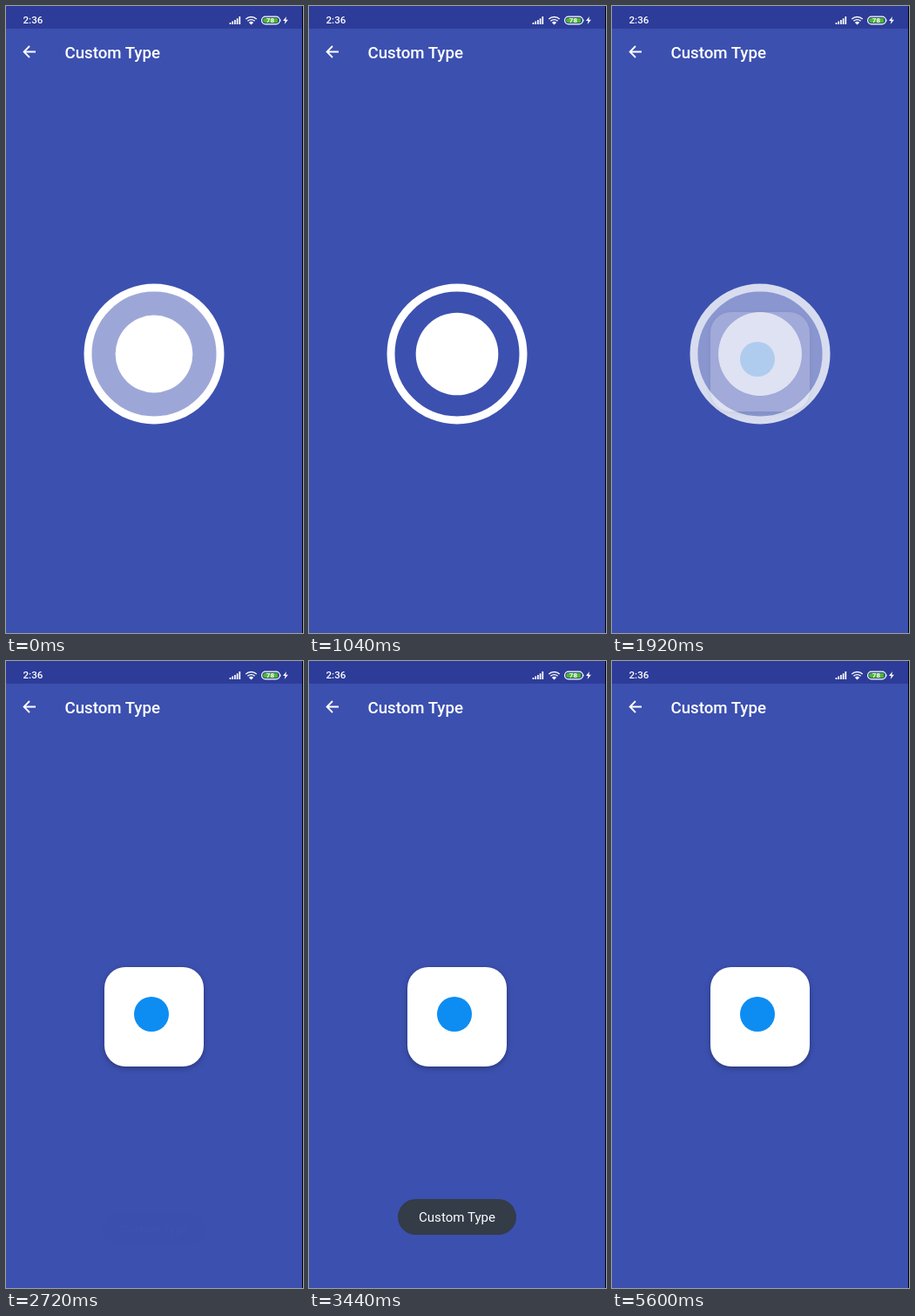
Recreate the animation shown at these times as an HTML page. Size 341x719 px, loop 5.68 s.

```html
<!DOCTYPE html>
<html lang="en">
<head>
<meta charset="utf-8">
<title>Custom Type</title>
<style>
  html, body { margin: 0; height: 100%; overflow: hidden; background: #3c50b0; }
  svg { display: block; width: 341px; height: 719px; font-family: Roboto, sans-serif; }
  #tile { filter: drop-shadow(0 2px 3px rgba(0, 0, 0, .3)); }
</style>
</head>
<body>
<svg viewBox="0 0 341 719" fill="#fff">
  <rect width="341" height="719" fill="#3c50b0"/>
  <rect width="341" height="26" fill="#2c3c98"/>

  <!-- status bar -->
  <text x="19.5" y="20.4" font-size="11.6" font-weight="500">2:36</text>
  <path d="M257.5 21v-2M260.2 21v-3.4M262.9 21v-5M265.6 21v-6.8M268.3 21v-9" stroke="#fff" stroke-width="1.7"/>
  <g fill="none" stroke="#fff" stroke-width="1.4">
    <path d="M275.3 15a9 9 0 0 1 12.4 0M277.4 17.2a6 6 0 0 1 8.2 0"/>
    <rect x="293.6" y="12.2" width="20.8" height="8.6" rx="4.3" stroke-width="1.2"/>
  </g>
  <path d="M278.9 18.9a4 4 0 0 1 5.2 0L281.5 21.6z"/>
  <path d="M298 13.7h14v5.6h-14a2.8 2.8 0 0 1 0-5.6z" fill="#4cb82e"/>
  <path d="M315.2 15q1.2 1.5 0 3z"/>
  <text x="303.4" y="19.4" font-size="8" font-weight="700" text-anchor="middle">78</text>
  <path d="M322 12l-4 5h2.6l-1 4 4.3-5.2h-2.7z"/>

  <!-- app bar -->
  <path d="M34 52.5H20.8M27 46l-6.4 6.5 6.4 6.5" fill="none" stroke="#fff" stroke-width="1.8"/>
  <text x="67.5" y="60" font-size="18.7" font-weight="500">Custom Type</text>

  <g id="loader" transform="translate(170 399)">
    <circle id="sector" r="36" fill="none" stroke="#9da7d7" stroke-width="72" pathLength="360" transform="rotate(-90)"/>
    <circle r="76" fill="none" stroke="#fff" stroke-width="9"/>
    <circle id="core"/>
  </g>

  <g id="tile">
    <rect x="113" y="351" width="114" height="114" rx="24"/>
    <circle cx="167" cy="405" r="20" fill="#0d8df2"/>
  </g>

  <g id="toast">
    <rect x="-68" y="-20.5" width="136" height="41" rx="20.5" fill="#333c47"/>
    <text y="5.5" font-size="15.1" text-anchor="middle">Custom Type</text>
  </g>

  <rect x="340" width="1" height="719" fill="#000"/>
</svg>
<script>
const LOOP = 5680;
const [loader, sector, core, tile, toast] =
  ['loader', 'sector', 'core', 'tile', 'toast'].map(id => document.getElementById(id));

const clamp = x => Math.min(1, Math.max(0, x));
const ease = (t, start, length) => (1 - Math.cos(Math.PI * clamp((t - start) / length))) / 2;
const settle = (t, start, tau) => 1 - Math.exp(-Math.max(0, t - start) / tau);

function drawLoader(t) {
  // the spinner stalls briefly between emptying and refilling
  if (t > 1040 && t < 1200) t = 1040;
  const start = t < 1040 ? 360 * ease(t, 0, 600) : 0;
  const sweep = t < 1040 ? 360 - start : 360 * ease(t, 1174, 600);
  const visible = sweep > 0.01;
  sector.style.display = visible ? '' : 'none';
  sector.setAttribute('stroke-dasharray', `${sweep} 360`);
  sector.setAttribute('stroke-dashoffset', -start);
  core.setAttribute('r', 44 + 5 * Math.cos(2 * Math.PI * (t - 885) / 1160));
}

function drawToast(t) {
  const leaving = t > 4700;
  const shown = leaving ? 1 - settle(t, 4735, 105) : settle(t, 2720, 130);
  const hidden = 1 - shown;
  const drop = hidden * (leaving ? 5.4 : 14);
  toast.setAttribute('opacity', shown);
  toast.setAttribute('transform', `translate(170 ${637.5 + drop}) scale(${1 - 0.12 * hidden})`);
}

function draw(now) {
  const t = now % LOOP;
  const swap = ease(t, 1790, 450);
  drawLoader(t);
  loader.setAttribute('opacity', 1 - swap);
  tile.setAttribute('opacity', swap);
  drawToast(t);
}

const origin = performance.now();
function tick() {
  draw(performance.now() - origin);
  requestAnimationFrame(tick);
}
tick();
</script>
</body>
</html>
```
